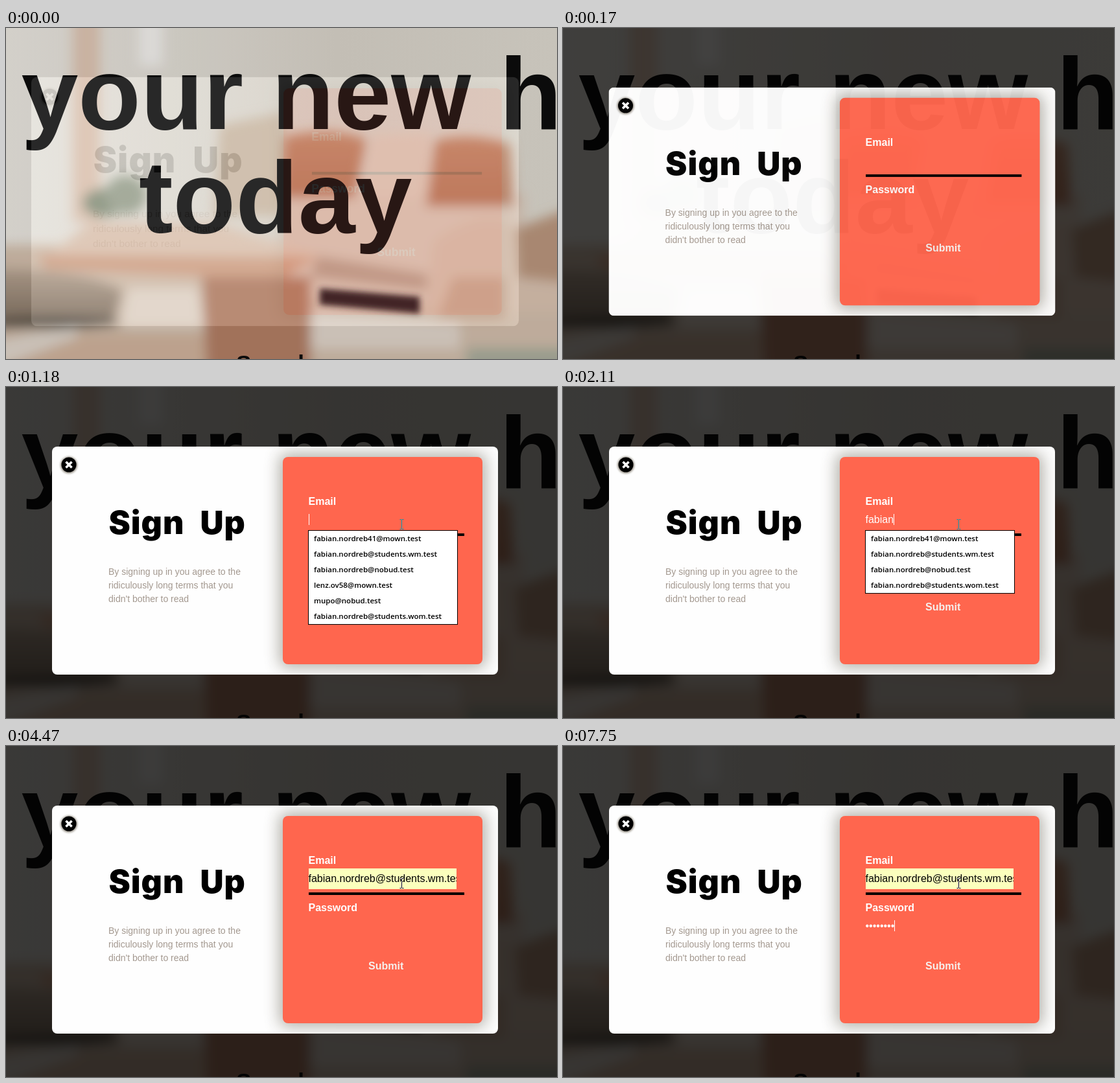
An HTML page for the animation above (7.99 s loop, 850 px wide and 511 px high).

```html
<!DOCTYPE html>
<html lang="en">
<head>
<meta charset="utf-8">
<title>Sign up form</title>
<style>
  html, body { margin: 0; width: 100%; height: 100%; overflow: hidden; background: #000; }
  svg { display: block; width: 850px; height: 511px; }
  text { font-family: "Liberation Sans", Arial, sans-serif; font-size: 16px; white-space: pre; }
  .bold { font-weight: 700; fill: #fff; }
  .hero { font-size: 158px; font-weight: 700; fill: #0d0d0d; }
  .title { font: 900 50px "Arial Black", Inter, sans-serif; letter-spacing: 1px; word-spacing: 13px; }
  .terms { font-size: 14px; fill: #a3988f; }
  .option { font: 600 11.5px "Open Sans", "Noto Sans", sans-serif; }
  #pointer { mix-blend-mode: difference; }
</style>
</head>
<body>
<svg viewBox="0 0 850 511">
  <defs>
    <filter id="soft" x="-30%" y="-30%" width="160%" height="160%"><feGaussianBlur stdDeviation="9"/></filter>
    <filter id="shade" x="-30%" y="-30%" width="160%" height="160%"><feGaussianBlur stdDeviation="12"/></filter>
    <filter id="near" x="-30%" y="-80%" width="160%" height="260%"><feGaussianBlur stdDeviation="5"/></filter>
    <filter id="halo" x="-50%" y="-50%" width="200%" height="200%"><feGaussianBlur stdDeviation="1.6"/></filter>
    <linearGradient id="wall">
      <stop offset="0" stop-color="#e6e3dc"/>
      <stop offset=".3" stop-color="#dedad2"/>
      <stop offset=".6" stop-color="#d5d0c6"/>
      <stop offset="1" stop-color="#d9d5cb"/>
    </linearGradient>
    <linearGradient id="cushion" x2="0" y2="1">
      <stop offset="0" stop-color="#c08a6d"/>
      <stop offset="1" stop-color="#b67b5e"/>
    </linearGradient>
    <linearGradient id="armchair" x2="0" y2="1">
      <stop offset="0" stop-color="#b5a290"/>
      <stop offset="1" stop-color="#796a5b"/>
    </linearGradient>
    <clipPath id="panelClip"><rect x="71" y="92" width="688" height="352" rx="8"/></clipPath>
    <clipPath id="fieldClip"><rect x="466" y="189" width="229" height="32"/></clipPath>
  </defs>

  <!-- Out-of-focus living room -->
  <rect width="850" height="511" fill="url(#wall)"/>
  <g filter="url(#soft)">
    <rect x="103" y="-30" width="42" height="330" fill="#dcc2b0"/>
    <rect x="205" y="-30" width="36" height="88" fill="#efedea"/>
    <rect x="-30" y="335" width="920" height="220" fill="#cfbba9"/>
    <path d="M330 150L430 130V290H320Z" fill="#cbb9a5"/>
    <path d="M440 255H800V420H400Z" fill="#d8c6b7"/>
    <path d="M430 168Q500 150 556 172L538 262H425Z" fill="url(#cushion)"/>
    <path d="M566 165L655 162V262H545Z" fill="#dccbbc"/>
    <path d="M662 174Q720 160 778 180L784 275H648Z" fill="url(#cushion)"/>
    <ellipse cx="150" cy="270" rx="32" ry="22" fill="#87917c"/>
    <ellipse cx="185" cy="258" rx="32" ry="30" fill="#9aa18f"/>
    <path d="M130 300H320L480 350V364H50Z" fill="#dcc3b0"/>
    <path d="M50 350L480 354L420 390L60 372Z" fill="#cfa085"/>
    <path d="M-30 372Q110 368 180 405L165 458L-30 466Z" fill="url(#armchair)"/>
    <ellipse cx="75" cy="455" rx="100" ry="9" fill="#4f493f"/>
    <path d="M-30 474H310V540H-30Z" fill="#cdb09a"/>
    <path d="M-30 485L110 462V478L-30 530Z" fill="#dcd3c9"/>
    <path d="M188 402H296L306 462H178Z" fill="#e0d3c6"/>
    <path d="M302 384H470V540H310Z" fill="#b07d63"/>
    <path d="M480 352L650 380V405L470 385Z" fill="#b99f8d"/>
    <path d="M470 436L700 455V495H470Z" fill="#ddd2c7"/>
    <path d="M660 330Q740 270 790 310L880 290V440H650Z" fill="#d6bfad"/>
    <path d="M785 310L880 275V395L790 385Z" fill="#b8947c"/>
    <path d="M690 385H770V450H665Z" fill="#c8a892"/>
    <rect x="710" y="494" width="170" height="40" fill="#a6aa9a"/>
  </g>
  <path d="M484 402L638 415V441L484 427Z" fill="#2b1f20" filter="url(#near)"/>
  <text class="hero" x="23.5" y="155.5">your new h</text>
  <text class="hero" x="205" y="315.5">today</text>
  <text class="hero" x="355" y="529.5" style="font-size:35px">Search</text>

  <g id="overlay">
    <rect width="850" height="511" opacity=".75"/>
    <g id="panel"><g clip-path="url(#panelClip)">
      <rect x="71" y="92" width="688" height="352" fill="#fefefe"/>
      <rect x="422" y="103" width="318" height="330" rx="10" fill="#5c5646" opacity=".48" filter="url(#shade)"/>
      <rect x="427" y="108" width="308" height="320" rx="8" fill="#ff664e"/>
      <circle cx="97" cy="120.5" r="13" fill="#6a6253" opacity=".7" filter="url(#halo)"/>
      <circle cx="97" cy="120" r="11.5"/>
      <path d="M92.5 115.5l9 9m0-9l-9 9" stroke="#fff" stroke-width="3.6"/>
      <text class="title" x="158.5" y="227">Sign Up</text>
      <text class="terms" x="158" y="290">By signing up in you agree to the</text>
      <text class="terms" x="158" y="311">ridiculously long terms that you</text>
      <text class="terms" x="158" y="332">didn't bother to read</text>
      <text class="bold" x="466.5" y="182">Email</text>
      <text class="bold" x="466.5" y="255">Password</text>
      <text class="bold" x="559" y="345" style="fill:#f6efec">Submit</text>
      <rect x="467" y="226" width="240" height="4"/>
    </g></g>
  </g>

  <rect id="fill" x="467" y="189" width="228" height="32" fill="#fbffbd"/>
  <g clip-path="url(#fieldClip)">
    <path id="squiggle" fill="none" stroke="#e00010" stroke-width="1.1"/>
    <text id="email" x="466.5" y="210"></text>
  </g>
  <text id="dots" x="466.5" y="283" fill="#fff"></text>
  <rect id="caret" width="1" height="17" fill="#fff"/>
  <g id="list">
    <rect id="listBox" x="466.5" y="221.5" width="230" fill="#fff" stroke="#000"/>
    <rect id="hover" x="467" width="229" height="24" fill="#cdcdcd"/>
    <g id="options"></g>
  </g>
  <path id="pointer" d="M-3 .5h2.5m1 0h2.5M0 1V15M-3 15.5h2.5m1 0h2.5" fill="none" stroke="#fff"/>
</svg>

<script>
const LOOP = 7990;
const NAME = "fabian.nordreb";
const MAILS = [
  NAME + "41@mown.test",
  NAME + "@students.wm.test",
  NAME + "@nobud.test",
  "lenz.ov58@mown.test",
  "mupo@nobud.test",
  NAME + "@students.wom.test"
];
const MATCHES = { 6: [0, 1, 2, 3, 4, 5], 5: [0, 1, 2, 3, 5], 4: [0, 1, 2, 5] };

// Each track is a list of [start time, value...]
const OPENING = [[0, .11, 1.093], [90, .79, 1.0215], [170, .97, 1.0015], [250, 1, 1]];
const POINTER = [[570, 706, 189], [620, 672, 194], [860, 646, 199], [940, 620, 203], [1020, 610, 204]];
const ROWS = [[1100, 6], [1560, 5], [1720, 4], [4470, 0]];
const HOVER = [[4080, 0], [4250, 1], [4470, -1]];
const TYPED = [[1490, 1], [1560, 2], [1720, 3], [1820, 4], [1970, 5], [2110, 6], [2520, 7],
  [2980, 8], [3150, 9], [3230, 10], [3310, 11], [3390, 13], [3460, 14]];
const CARET = [[1020, 1], [4000, 0], [4950, 2], [5490, 0], [6040, 2]];
const DOTS = [6190, 6430, 6590, 6820, 7060, 7370, 7600, 7750];

const $ = id => document.getElementById(id);
const set = (id, attrs) => { for (const k in attrs) $(id).setAttribute(k, attrs[k]); };
const show = (id, on) => set(id, { visibility: on ? "visible" : "hidden" });
const at = (track, t, start = [0]) =>
  track.reduce((found, [time, ...values]) => time <= t ? values : found, start);

function write(id, content) {
  if ($(id).textContent !== content) $(id).textContent = content;
}

const width = (id, from, count) => count > 0 ? $(id).getSubStringLength(from, count) : 0;

function wave(text, word) {
  const from = text.indexOf(word);
  const x = 466.5 + width("email", 0, from);
  const periods = Math.round(width("email", from, word.length) / 4);
  return `M${x} 212.5` + "q1-2 2 0t2 0".repeat(periods);
}

function fillOptions(rows) {
  if ($("options").dataset.rows === String(rows)) return;
  $("options").dataset.rows = rows;
  $("options").innerHTML = MATCHES[rows].map((m, i) =>
    `<text class="option" x="475" y="${238 + 24 * i}">${MAILS[m]}</text>`).join("");
}

function render(t) {
  const [opacity, scale] = at(OPENING, t);
  set("overlay", { opacity });
  set("panel", { transform: `translate(415 268) scale(${scale}) translate(-415 -268)` });

  const [px, py] = at(POINTER, t, [-50, 0]);
  set("pointer", { transform: `translate(${px + .5} ${py})` });

  // Email field: typed by hand, then completed from the list
  const [hover] = at(HOVER, t, [-1]);
  const completed = t >= 4080;
  const text = completed ? MAILS[t < 4250 ? 0 : 1] : NAME.slice(0, at(TYPED, t)[0]);
  write("email", text);
  set("email", { fill: completed ? "#000" : "#fff" });
  show("fill", completed);

  let words = [];
  if (t >= 2520 && t < 4080) words = ["fabian"];
  if (t >= 4550 && t < 4950) words = ["fabian", "nordreb", "wm.test"];
  set("squiggle", { d: words.map(w => wave(text, w)).join("") });

  // Suggestions
  const [rows] = at(ROWS, t);
  show("list", rows);
  if (rows) {
    fillOptions(rows);
    set("listBox", { height: 24 * rows + 1 });
    set("hover", { y: 222 + 24 * hover, opacity: hover < 0 ? 0 : 1 });
  }

  // Password field and caret
  const dots = DOTS.filter(time => time <= t).length;
  write("dots", "•".repeat(dots));
  const [field] = at(CARET, t);
  show("caret", field);
  const typedWidth = field === 2 ? width("dots", 0, dots) : width("email", 0, text.length);
  set("caret", { x: Math.round(466.6 + typedWidth), y: field === 2 ? 269 : 196 });
}

const began = performance.now();
function tick() {
  render((performance.now() - began) % LOOP);
  requestAnimationFrame(tick);
}
tick();
</script>
</body>
</html>
```
